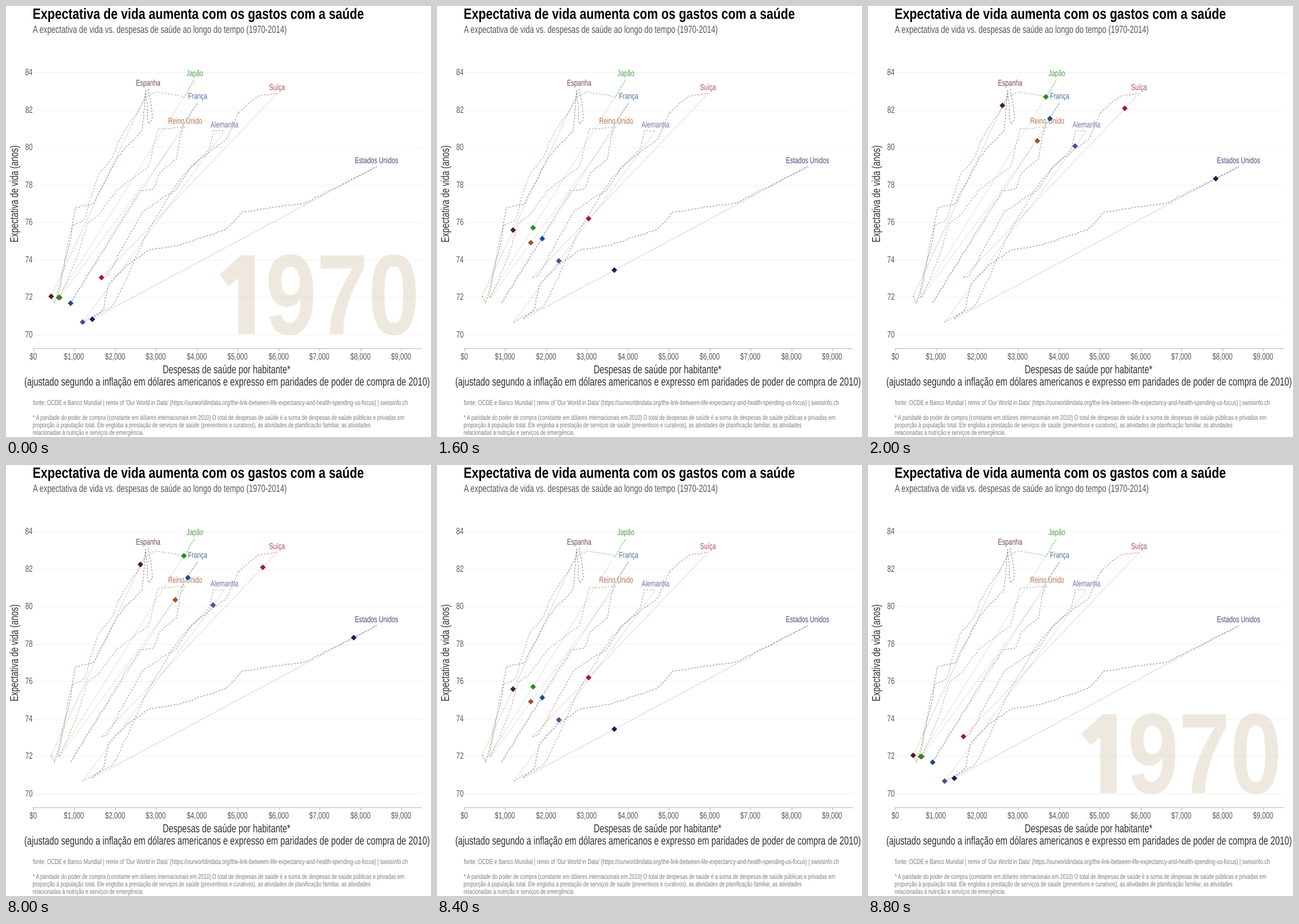
A matplotlib script for the animation above (10000 ms loop, 743 px wide and 754 px high).

```python
import matplotlib.pyplot as plt
import numpy as np
from matplotlib.animation import FuncAnimation
from matplotlib.patches import PathPatch, Polygon
from matplotlib.textpath import TextPath
from matplotlib.transforms import Affine2D

W, H, DPI = 743, 754, 72
STEP, FRAMES = 200, 50
CONDENSE = {"normal": 0.72, "bold": 0.81}
YEAR_COLOR = "#eee8df"
DARK, MID, PALE = "#303030", "#555555", "#7c7c7c"

fig = plt.figure(figsize=(W / DPI, H / DPI), dpi=DPI, facecolor="white")
ax = fig.add_axes([0, 0, 1, 1])
ax.set_xlim(0, W)
ax.set_ylim(H, 0)
ax.axis("off")


def write(x, y, s, size, color, align=0.0, weight="normal", angle=0, alpha=1, z=3):
    """Condensed text on baseline y; align 0 = left, 0.5 = centre, 1 = right."""
    path = TextPath((0, 0), s, size=size,
                    prop={"family": "Liberation Sans", "weight": weight})
    box = path.get_extents()
    shift = Affine2D().translate(-box.x0 - align * box.width, 0)
    place = shift.scale(CONDENSE[weight], -1).rotate_deg(angle).translate(x, y)
    patch = PathPatch(place.transform_path(path), fc=color, lw=0, alpha=alpha, zorder=z)
    return ax.add_patch(patch)


def big_year(text, left=363, base=574, pitch=90):
    """Year in equal cells, with a plain footless figure one."""
    one = [(72, 0), (43, 0), (43, -98), (26, -84), (10, -104), (48, -138), (72, -138)]
    parts = []
    for i, digit in enumerate(text):
        x = left + i * pitch
        if digit == "1":
            shape = Polygon([(x + dx, base + dy) for dx, dy in one],
                            fc=YEAR_COLOR, lw=0, zorder=0)
            parts.append(ax.add_patch(shape))
        else:
            parts.append(write(x + pitch / 2, base, digit, 200, YEAR_COLOR,
                               0.5, "bold", z=0))
    return parts


# Headings and axes
write(48, 22.5, "Expectativa de vida aumenta com os gastos com a saúde", 26.2, "black",
      weight="bold")
write(47, 47, "A expectativa de vida vs. despesas de saúde ao longo do tempo (1970-2014)",
      18, MID)

for age in range(70, 85, 2):
    y = round(115 + (84 - age) * 32.79) + 0.5
    ax.plot([47, 726], [y, y], color="#d4d4d4", lw=1, ls=(0, (1, 2)), zorder=1)
    write(46, y + 5.5, str(age), 16, MID, 1)

ax.plot([47, 726], [598.5, 598.5], color="#b5b5b5", lw=1, zorder=1)
for cost in range(0, 10000, 1000):
    x = round(47 + cost * 0.07148) + 0.5
    ax.plot([x, x], [598.5, 603], color="#b5b5b5", lw=1, zorder=1)
    write(x, 618.5, f"${cost:,}", 16, MID, 0.5)

write(21, 328.5, "Expectativa de vida (anos)", 20, DARK, 0.5, angle=-90)
write(386, 642.5, "Despesas de saúde por habitante*", 20.2, DARK, 0.5)
write(386.5, 664, "(ajustado segundo a inflação em dólares americanos e expresso em "
      "paridades de poder de compra de 2010)", 20.34, DARK, 0.5)

# Notes
write(47, 698, "fonte: OCDE e Banco Mundial | remix of 'Our World in Data' "
      "(https://ourworldindata.org/the-link-between-life-expectancy-and-health-"
      "spending-us-focus) | swissinfo.ch", 12.47, PALE)
notes = [
    "* A paridade do poder de compra (constante em dólares internacionais em 2010) O total "
    "de despesas de saúde é a soma de despesas de saúde públicas e privadas em",
    "proporção à população total. Ele engloba a prestação de serviços de saúde (preventivos "
    "e curativos), as atividades de planificação familiar, as atividades",
    "relacionadas à nutrição e serviços de emergência.",
]
for i, line in enumerate(notes):
    write(47, 724 + 13.1 * i, line, 12.1, PALE)

# Countries
rng = np.random.default_rng(1970)
movers = []


def history(keys, step=9, wobble=1.1):
    """Polyline through the keys with small yearly irregularities."""
    pts = np.array(keys, float)
    arc = np.r_[0, np.cumsum(np.hypot(*np.diff(pts, axis=0).T))]
    s = np.union1d(arc, np.arange(0, arc[-1], step))
    noise = rng.uniform(-wobble, wobble, (2, len(s))) * ~np.isin(s, arc)
    return np.array([np.interp(s, arc, axis) for axis in pts.T]) + noise


def country(name, color, *keys):
    """Dashed history, straight link, label and moving diamond."""
    start, end = np.array(keys[0]), np.array(keys[-1])
    ax.plot(*history(keys), color=color, lw=1, ls=(0, (3, 2.5)), alpha=0.58, zorder=2,
            dash_capstyle="butt")
    ax.plot(*zip(start, end), color=color, lw=0.8, alpha=0.23, zorder=2)
    write(end[0], end[1] - 6, name, 15, color, 0.5, alpha=0.8)
    dot, = ax.plot([], [], "D", color=color, ms=6.6, mew=0, zorder=5, snap=False)
    movers.append((dot, start, end))


country("Estados Unidos", "#1f1a50", (151, 547.5), (170, 530), (179, 487), (211, 453),
        (255, 425), (305, 418), (385, 391), (411, 361), (525, 344), (648, 281))
country("Alemanha", "#504c92", (134, 553), (187, 525), (214, 470), (240, 410),
        (263, 368), (303, 305), (356, 249), (362, 218), (382, 218.5))
country("Suíça", "#9c1f2c", (167, 475), (177, 472), (205, 420), (240, 358), (297, 322),
        (325, 280), (388, 230), (407, 186), (440, 158), (474, 153))
country("França", "#1f4b8c", (113, 519.5), (234, 323), (258, 320), (268, 292),
        (298, 267), (308, 213), (335.5, 168.5))
country("Reino Unido", "#a0532d", (94, 509.5), (118, 455), (143, 380), (163, 364),
        (194, 322), (250, 280), (265, 215), (313.5, 212))
country("Japão", "#2a8a22", (91.5, 510), (115, 384), (137, 374), (160, 298),
        (188, 262), (197, 235), (247, 158), (264, 150), (312, 160), (330, 128.5))
country("Espanha", "#4c1d22", (79, 507.5), (85, 520), (110, 420), (121, 353), (152, 347),
        (197, 262), (238, 218), (244, 148), (249, 206), (256, 198), (249, 145.5))

first_year = big_year("1970")
last_year = big_year("2014")


def ease(t):
    return 2 * t * t if t < 0.5 else 1 - 2 * (1 - t) ** 2


def progress(i):
    """Out over five steps, hold, and back over five steps."""
    out = min(max((i - 6) / 5, 0), 1)
    back = min(max((44 - i) / 5, 0), 1)
    return ease(min(out, back))


def update(i):
    p = progress(i)
    for dot, start, end in movers:
        x, y = start + (end - start) * p
        dot.set_data([x], [y])
    for part in first_year:
        part.set_visible(p == 0)
    for part in last_year:
        part.set_visible(p == 1)
    return []


anim = FuncAnimation(fig, update, frames=FRAMES, interval=STEP, repeat=True,
                     repeat_delay=0, blit=False)
plt.show()
```
